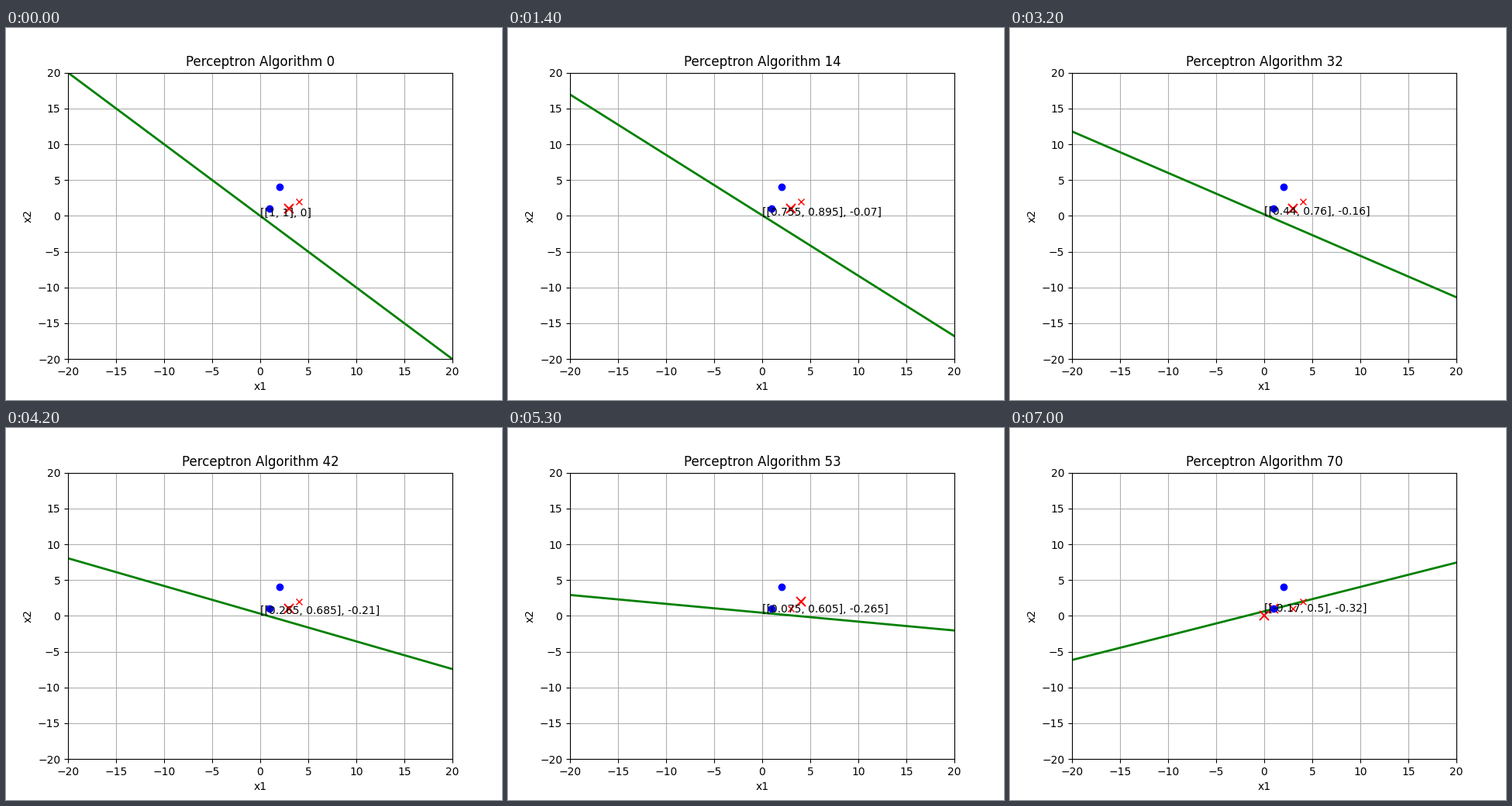
Recreate the animation shown at these times as a matplotlib script. Size 640 by 480 pixels, loop 7100 ms.

```python
import matplotlib.pyplot as plt
import numpy as np
from matplotlib.animation import FuncAnimation

STEPS = 70
RATE = 0.005
SAMPLES = [((1, 1), 1), ((2, 4), 1), ((3, 1), -1), ((4, 2), -1)]


def train():
    """Return (weights, bias, misclassified point) for every update.

    Values are kept as whole multiples of RATE so ties are exact.
    """
    w, b = np.array([200, 200]), 0
    history = []
    while len(history) < STEPS:
        for point, label in SAMPLES:
            if label * (w @ point + b) <= 0 and len(history) < STEPS:
                history.append((w * RATE, b * RATE, [point]))
                w = w + label * np.array(point)
                b += label
    history.append((w * RATE, b * RATE, [(1, 1), (0, 0)]))
    return history


history = train()

fig, ax = plt.subplots(figsize=(6.4, 4.8), dpi=100)
ax.set(xlim=(-20, 20), ylim=(-20, 20), xlabel="x1", ylabel="x2")
ax.grid(True)

boundary, = ax.plot([], [], "g", lw=2)
wrong, = ax.plot([], [], "rx", ms=9, mew=1.4)
for name, sign in (("bo", 1), ("rx", -1)):
    ax.plot(*zip(*[p for p, label in SAMPLES if label == sign]), name)
label = ax.text(0, 0, "")
title = ax.set_title("")
xs = np.array([-20, 20])


def update(step):
    (w1, w2), b, points = history[step]
    boundary.set_data(xs, -(b + w1 * xs) / w2)
    wrong.set_data(*zip(*points))
    label.set_position((0, -b / w2))
    label.set_text(f"[[{w1:.4g}, {w2:.4g}], {b:.4g}]")
    title.set_text(f"Perceptron Algorithm {step}")
    return boundary, wrong, label, title


anim = FuncAnimation(fig, update, frames=STEPS + 1, interval=100,
                     repeat=True, repeat_delay=0)
plt.show()
```
